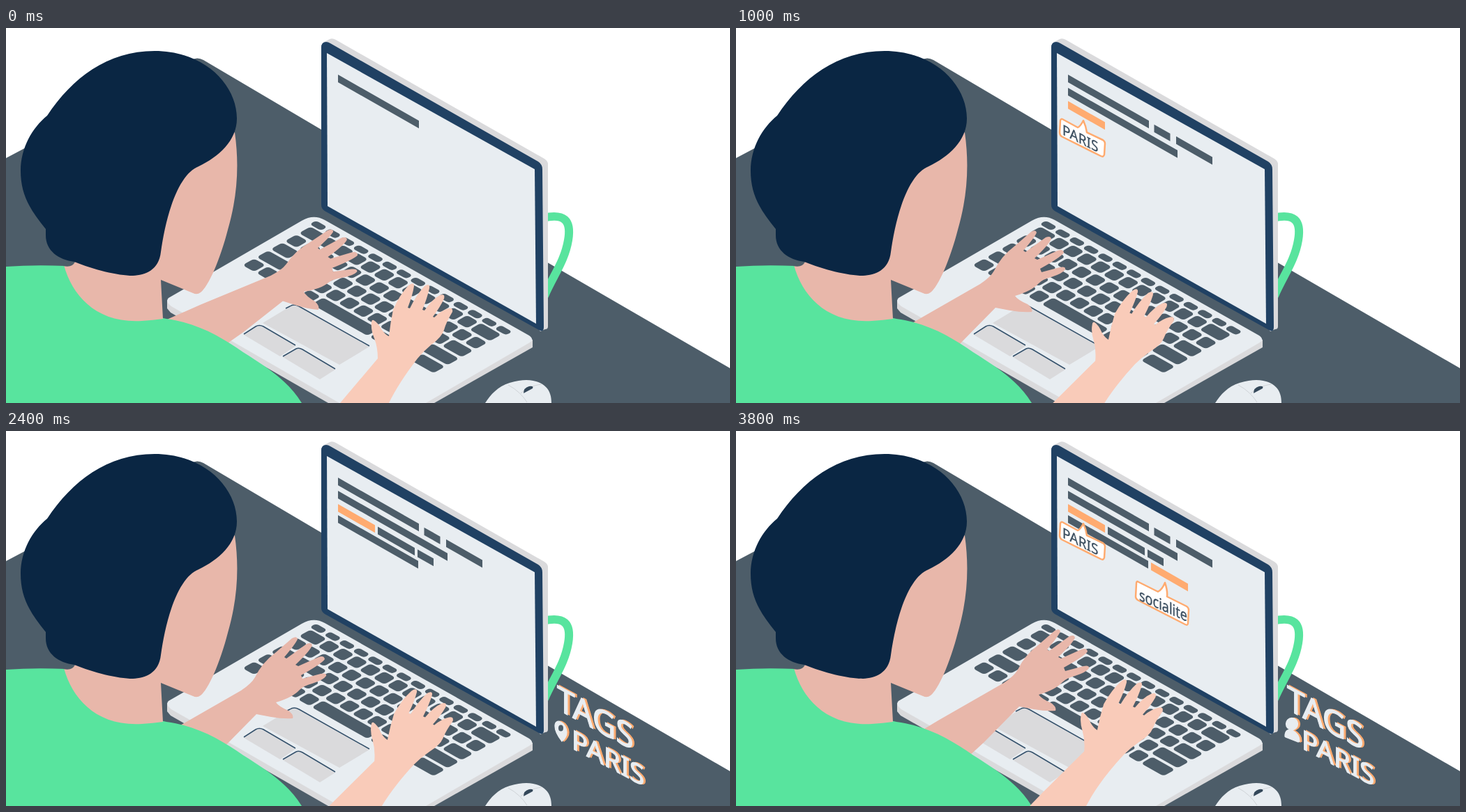
An HTML page for the animation above (4.8 s loop, 1038 by 539 pixels).

```html
<!DOCTYPE html>
<html lang="en">
<head>
<meta charset="utf-8">
<title>Typing and tagging</title>
<style>
  html, body { margin: 0; width: 100%; height: 100%; overflow: hidden; background: #fff; }
  svg { display: block; width: 100%; height: 100%; }
  text { font-family: "Noto Sans", "Open Sans", sans-serif; }
  .slate { fill: #4d5d69; }
  .light { fill: #e8edf1; }
  .grey { fill: #dadadc; }
  .green { fill: #58e49e; }
  .skin { fill: #e8b7aa; }
  .hair { fill: #0a2643; }
  .orange { fill: #ffab70; }
  .groove { fill: none; stroke: #34506a; stroke-width: 1.5; }
  .label path { fill: #fff; stroke: #ffab70; stroke-width: 2.5; stroke-linejoin: round; }
  .label text { fill: #3c4f60; stroke: #3c4f60; stroke-width: .3; }
  .sign { font-weight: 500; stroke-width: 1.3; }
  .sign .back { fill: #ffab70; stroke: #ffab70; }
  .sign .front { fill: #e8edf1; stroke: #e8edf1; }
</style>
</head>
<body>
<svg viewBox="0 0 1038 539" preserveAspectRatio="none">
  <defs>
    <g id="words">
      <text font-size="46" transform="matrix(1 .54 0 1.06 790 400)">TAGS</text>
      <text font-size="38.5" transform="matrix(1 .53 0 1 811 456)">PARIS</text>
    </g>
    <path id="pin" d="M797 446C790 437 787 431 787 424C787 418 791 416 795 418C800 420 804 427 804 433C804 438 801 443 797 446Z"/>
    <g id="person">
      <circle cx="797" cy="421" r="8.5"/>
      <path d="M787 439C787 429 793 428 799 431C806 435 808 440 808 446L806 447L788 440Z"/>
    </g>
  </defs>

  <!-- desk and cable -->
  <path class="slate" d="M0 187L266 46Q274 41 283 46L452 146L778 338L1038 489V539H0Z"/>
  <path d="M770 273C800 266 811 276 806 305C801 335 785 355 772 385" fill="none" stroke="#58e49e" stroke-width="12"/>

  <!-- screen -->
  <path class="grey" d="M456 20L464 16Q468 14 473 17L772 188Q777 191 777 196V429Q777 433 773 433L766 436Z"/>
  <path fill="#204163" d="M452 28Q452 20 459 20Q462 20 465 22L763 192Q769 196 769 203L771 430Q771 438 764 434L457 263Q452 260 452 254Z"/>
  <path class="light" d="M460 36L758 203L760 425L461 256Z"/>
  <g id="bars" transform="matrix(1 .572 0 1 476 67)"></g>
  <g id="paris" class="label">
    <path d="M468 131L490 143Q494 141 498 133Q502 142 503 150L526 161Q529 163 529 166L528 182Q527 186 523 184L467 156Q464 154 464 150L465 133Q466 130 468 131Z"/>
    <text font-size="19" transform="matrix(1 .51 0 1.08 468 153)">PARIS</text>
  </g>
  <g id="socialite" class="label">
    <path d="M577 217L605 231Q611 228 615 218Q619 230 618 238L646 252Q649 254 649 257L648 276Q648 280 644 278L576 243Q573 241 573 238L574 219Q574 215 577 217Z"/>
    <text font-size="18" transform="matrix(1 .45 0 1.25 578 243)">socialite</text>
  </g>

  <!-- laptop base -->
  <path class="grey" d="M231 391V403L236 409L462 539H614L755 459V448Z"/>
  <path class="light" d="M233 388L424 277Q441 267 457 276L750 442Q758 448 751 452L602 539H478L237 400Q228 393 233 388Z"/>
  <g id="keys" class="slate" transform="matrix(20.4 11.57 -20.2 11.5 457 283.5)"></g>
  <path class="grey" d="M368 424L406 401Q413 397 420 401L521 458L478 484Z"/>
  <path class="grey" d="M341 441L358 430Q363 427 369 430L415 457L393 472Z"/>
  <path class="grey" d="M397 473L416 462Q420 460 425 463L472 491L450 505Z"/>
  <path class="groove" d="M401 403L407 400Q413 396 420 400L521 457M341 440L358 429Q363 426 369 429L415 456M397 472L416 461Q420 459 425 462L472 490"/>

  <!-- mouse -->
  <path class="light" d="M687 539C695 527 705 515 722 510C748 502 765 507 774 516C780 522 782 530 782 539Z"/>
  <path d="M720 513Q738 523 747 538M738 525Q750 514 768 512" fill="none" stroke="#cfd3d7"/>
  <path fill="#34485a" d="M742 525Q742 517 750 515Q757 514 755 518Z"/>

  <!-- desk lettering -->
  <g id="sign" class="sign">
    <use href="#words" class="back" x="3"/>
    <use href="#words" class="front"/>
    <g id="pinIcon">
      <use href="#pin" class="back" x="3"/>
      <use href="#pin" class="front"/>
      <ellipse class="slate" cx="795.5" cy="427" rx="3.5" ry="4.5"/>
    </g>
    <g id="personIcon">
      <use href="#person" class="back" x="3"/>
      <use href="#person" class="front"/>
    </g>
  </g>

  <!-- woman -->
  <path id="left" class="skin" d="M190 462L256 422L350 368Q365 358 370 349Q380 328 400 313L423 293Q430 289 431 294Q429 300 412 320L415 322L444 301Q451 298 452 303Q449 311 428 331L432 333L461 320Q469 317 470 323Q465 330 436 346L438 351L464 344Q473 342 472 347Q468 353 452 358Q440 361 434 367Q424 378 400 385Q404 391 418 397Q426 403 424 408Q410 409 393 406L372 402L322 453L260 510Z"/>
  <path class="green" d="M0 343Q40 340 85 342L195 410L230 418C275 424 310 445 340 466C375 488 405 508 424 539H0Z"/>
  <path class="skin" d="M83 341C95 385 130 425 195 421Q211 420 225 418L222 362V320L100 336Z"/>
  <path class="slate" d="M82 342Q95 345 99 336L84 330Z"/>
  <path class="skin" d="M328 150C335 200 331 245 318 290C307 333 290 372 279 380Q274 384 268 381L222 362V250L270 180Z"/>
  <path class="hair" d="M59 126C95 72 145 33 213 33C285 33 331 82 331 130C331 162 305 185 276 199C244 212 228 278 222 322C219 348 200 355 182 356C160 356 125 347 98 336C75 333 57 320 57 298V289C35 262 21 240 21 205C21 172 38 143 59 126Z"/>
  <path id="right" fill="#f9cbb9" d="M524 424Q524 419 527 420Q533 423 539 434Q544 441 549 443Q551 424 555 405Q564 384 577 370Q585 364 585 371Q583 384 576 402L579 403Q588 384 600 371Q608 366 607 374Q604 388 597 405L600 406Q611 390 622 384Q630 381 628 389Q622 402 612 415L614 416Q624 406 634 403Q641 401 640 408Q631 423 628 434Q625 444 610 455Q599 464 590 475Q563 510 549 539L535 570L450 575L479 539L533 475Q533 459 528 446Q523 434 524 424Z"/>
</svg>
<script>
  const LOOP = 4800;
  const $ = id => document.getElementById(id);

  function addRect(parent, x, y, width, height, extra = {}) {
    const rect = document.createElementNS("http://www.w3.org/2000/svg", "rect");
    for (const [name, value] of Object.entries({ x, y, width, height, ...extra })) {
      rect.setAttribute(name, value);
    }
    parent.append(rect);
    return rect;
  }

  // Key widths per row, in key pitches.
  const KEY_PITCH = .97;
  const ones = count => Array(count).fill(1);
  const keyRows = [
    [1.35, ...ones(11), 1.65],
    ones(14),
    [1.4, ...ones(11), 1.6],
    [1.9, ...ones(10), 2.1],
    [...ones(5), 4.2, ...ones(3), 1.8],
  ];
  for (let i = 0; i < 14; i++) addRect($("keys"), i - .6, .02, .8, .45, { rx: .2 });
  keyRows.forEach((row, r) => {
    let x = -.5;
    for (const units of row) {
      const width = units * KEY_PITCH;
      addRect($("keys"), x + .08, r + .59, width - .16, .82, { rx: .22 });
      x += width;
    }
  });

  // Text bars in typing order: x, y, width, class.
  const bars = [
    [0, 0, 116, "slate"], [123.5, 1, 23, "slate"], [155, 0, 52, "slate"],
    [0, 19, 157, "slate"],
    [0, 38, 53, "orange"], [57, 38, 53, "slate"], [114, 38, 23, "slate"],
    [0, 54, 115, "slate"], [119, 54, 53, "orange"],
  ].map(([x, y, width, name]) => addRect($("bars"), x, y, width, 11, { class: name }));

  // Hand poses: thumb x, thumb y, rotation.
  const thumbs = { left: [424, 406], right: [526, 420] };
  const steps = [
    { at: 0, bars: 1, left: [448, 403, 7.3], right: [526, 420, 0] },
    { at: 200, bars: 2, left: [457, 417, 11], right: [516, 417, 0] },
    { at: 400, bars: 3, left: [467, 432, 14.6], right: [506, 414, 0] },
    { at: 600, bars: 4, left: [453, 423, 10], right: [508, 417, 1] },
    { at: 800, bars: 5, left: [438, 414, 5], right: [511, 420, 3] },
    { at: 1000, bars: 5, show: "paris", left: [424, 406, 0], right: [513, 423, 5] },
    { at: 1500, bars: 5, show: "paris sign pinIcon", left: [424, 406, 0], right: [513, 423, 5] },
    { at: 2000, bars: 6, show: "paris sign pinIcon", left: [438, 397, 0], right: [513, 428, 0] },
    { at: 2200, bars: 7, show: "paris sign pinIcon", left: [424, 404, 0], right: [520, 424, 2] },
    { at: 2400, bars: 8, show: "sign pinIcon", left: [411, 411, 0], right: [526, 419, 5] },
    { at: 2600, bars: 9, show: "sign pinIcon", left: [435, 405, 0], right: [512, 412, 5] },
    { at: 2800, bars: 9, show: "paris socialite sign pinIcon", left: [458, 400, 0], right: [497, 405, 5] },
    { at: 3300, bars: 9, show: "paris socialite sign personIcon", left: [458, 400, 0], right: [497, 405, 5] },
  ];
  const optional = ["paris", "socialite", "sign", "pinIcon", "personIcon"];

  function draw(now) {
    const time = now % LOOP;
    const step = steps.findLast(s => s.at <= time);
    const shown = (step.show || "").split(" ");
    bars.forEach((bar, i) => bar.style.display = i < step.bars ? "" : "none");
    for (const id of optional) $(id).style.display = shown.includes(id) ? "" : "none";
    for (const [hand, [px, py]] of Object.entries(thumbs)) {
      const [x, y, angle] = step[hand];
      $(hand).setAttribute("transform", `translate(${x} ${y}) rotate(${angle}) translate(${-px} ${-py})`);
    }
  }

  let start;
  function tick(now) {
    start ??= now;
    draw(now - start);
    requestAnimationFrame(tick);
  }
  draw(0);
  requestAnimationFrame(tick);
</script>
</body>
</html>
```
